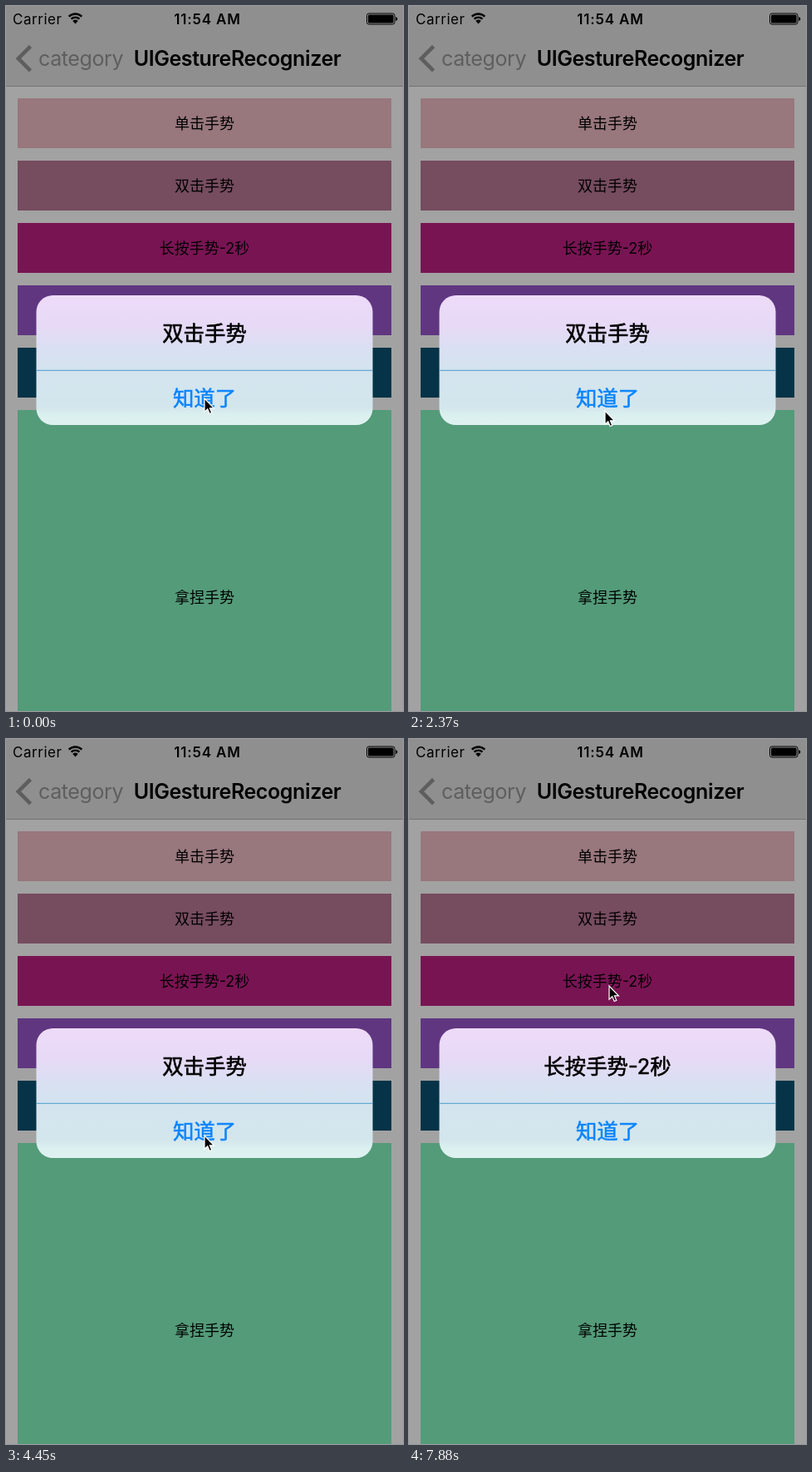
Animation, 478 px wide and 848 px high, one loop 8 s. Source, as an HTML page:

```html
<!DOCTYPE html>
<html lang="zh">
<head>
<meta charset="utf-8">
<style>
  html, body { margin: 0; width: 100%; height: 100%; overflow: hidden; background: #fff; }
  svg { display: block; width: 100vw; height: 100vh; font-family: Inter, "Noto Sans CJK SC", "Noto Sans CJK", sans-serif; }
  .mid { text-anchor: middle; }
  .status { font-size: 17px; }
  .nav { font-size: 25px; letter-spacing: -.4px; }
  .bold { font-weight: 600; }
  .row { font-size: 18px; }
  .alert { font-size: 25.4px; stroke-width: .6px; }
</style>
</head>
<body>
<svg viewBox="0 0 478 848">
  <defs>
    <linearGradient id="frost" x1="0" y1="0" x2="0" y2="1">
      <stop offset="0" stop-color="#eedaf9"/>
      <stop offset=".25" stop-color="#e6daf6"/>
      <stop offset=".42" stop-color="#d9e0f2"/>
      <stop offset=".58" stop-color="#d4e4ef"/>
      <stop offset=".86" stop-color="#d3e6ec"/>
      <stop offset=".92" stop-color="#daf0ef"/>
      <stop offset="1" stop-color="#def2f0"/>
    </linearGradient>
  </defs>

  <rect width="478" height="96" fill="#e1e1e1"/>
  <rect y="96" width="478" height="1" fill="#b4b4b4"/>
  <text class="status" x="8" y="22" letter-spacing=".55">Carrier</text>
  <g fill="none" stroke="#000" stroke-width="2.4">
    <path d="M75.7 12.7a11 11 0 0 1 15.6 0M78.6 15.6a7 7 0 0 1 9.8 0"/>
    <path d="M83.5 21.5l-3.2-3.6a4.4 4.4 0 0 1 6.4 0z" fill="#000" stroke="none"/>
  </g>
  <text class="status bold mid" x="242.5" y="22" letter-spacing=".8">11:54 AM</text>
  <rect x="434.5" y="9" width="33.5" height="13" rx="2.5" fill="none" stroke="#000"/>
  <rect x="436" y="10.5" width="30.5" height="10" rx="1.2"/>
  <path d="M469.3 13q2 .5 2 2.5t-2 2.5z"/>
  <g id="back">
    <path d="M29.5 48.5L14.8 63.2L29.5 77.9" fill="none" stroke="currentColor" stroke-width="4.6"/>
    <text class="nav" x="39" y="72" fill="currentColor">category</text>
  </g>
  <text class="nav bold mid" x="278.5" y="72">UIGestureRecognizer</text>
  <g id="rows"></g>

  <rect id="dim" width="478" height="848"/>
  <g id="alert">
    <rect id="panel" x="36.5" y="348" width="405" height="156" rx="20"/>
    <rect id="divider" x="36.5" y="437.8" width="405" height="1" fill="#4a9acb"/>
    <g id="words" class="alert mid">
      <text id="title" x="239" y="402.5" stroke="#000"></text>
      <text x="239" y="481" fill="#0a84ff" stroke="#0a84ff">知道了</text>
    </g>
  </g>
  <path id="cursor" d="M0 0V16.2L3.7 12.8L6.2 18.5L8.8 17.4L6.4 11.8H11.4Z" stroke="#fff" stroke-width="1.2"/>
</svg>
<script>
const $ = id => document.getElementById(id);
const LOOP = 8000;

const rows = [
  ['单击手势', '#eebbc4'], ['双击手势', '#ba7895'], ['长按手势-2秒', '#be2083'],
  ['拖动手势', '#9755c9'], ['滑动手势-向右', '#0a5070'], ['拿捏手势', '#84f4be', 450],
];
$('rows').innerHTML = rows.map(([label, color, height = 60], i) => {
  const y = 111 + 75 * i;
  return `<rect x="14" y="${y}" width="450" height="${height}" fill="${color}"/>
    <text class="row mid" x="239" y="${y + height / 2 + 7}">${label}</text>`;
}).join('');

// Screen refreshes: first, last, count
const ticks = [
  [0, 0, 1], [150, 150, 1], [440, 1180, 6], [1620, 2520, 7],
  [2670, 3700, 8], [3850, 4750, 7], [4900, 5200, 3], [7440, 7880, 4],
].flatMap(([first, last, n]) => Array.from({ length: n }, (_, i) =>
  Math.round((first + (last - first) * i / Math.max(1, n - 1)) / 10) * 10));

const alerts = [
  { title: '双击手势', show: -1000, hide: 400 },
  { title: '双击手势', show: 1585, hide: 2640 },
  { title: '双击手势', show: 3524, hide: 4660 },
  { title: '长按手势-2秒', show: 7381, hide: 9000 },
];

// Pointer moves: start, end, target x, target y
const moves = [
  [0, 150, 239, 476], [440, 1180, 220, 219], [1770, 2370, 236, 487],
  [2820, 3400, 198, 120], [3700, 4300, 239, 477], [4600, 5200, 241, 297],
];

const clamp = v => Math.min(1, Math.max(0, v));
const smooth = v => v * v * (3 - 2 * v);
const spring = ms => {
  const x = Math.max(0, ms) * .018;
  return 1 - (1 + x) * Math.exp(-x);
};

function pointerAt(t) {
  let x = 239, y = 472;
  for (const [start, end, tx, ty] of moves) {
    const k = smooth(clamp((t - start) / (end - start)));
    x += (tx - x) * k;
    y += (ty - y) * k;
  }
  return [x, y];
}

function draw(t) {
  const alert = alerts.findLast(a => t >= a.show);
  const shown = spring(t - alert.show);
  let p = shown * (1 - spring(t - alert.hide));
  if (p > .99) p = 1;
  if (p < .01) p = 0;
  const full = p === 1;
  const scale = full ? 1 : 1.2 - .2 * shown;

  $('dim').setAttribute('opacity', .365 * p);
  $('back').style.color = `rgb(${[12, 131, 255].map(c => c + (148 - c) * p)})`;
  $('alert').setAttribute('transform', `translate(239 426) scale(${scale}) translate(-239 -426)`);
  $('panel').setAttribute('fill', full ? 'url(#frost)' : '#fff');
  $('panel').setAttribute('opacity', p);
  $('divider').setAttribute('opacity', full ? 1 : 0);
  $('words').setAttribute('opacity', Math.min(1, 1.25 * p));
  $('title').textContent = alert.title;
  $('cursor').setAttribute('transform', `translate(${pointerAt(t)})`);
}

function frame() {
  const now = performance.now() % LOOP;
  draw(ticks.findLast(tick => tick <= now));
  requestAnimationFrame(frame);
}
frame();
</script>
</body>
</html>
```
